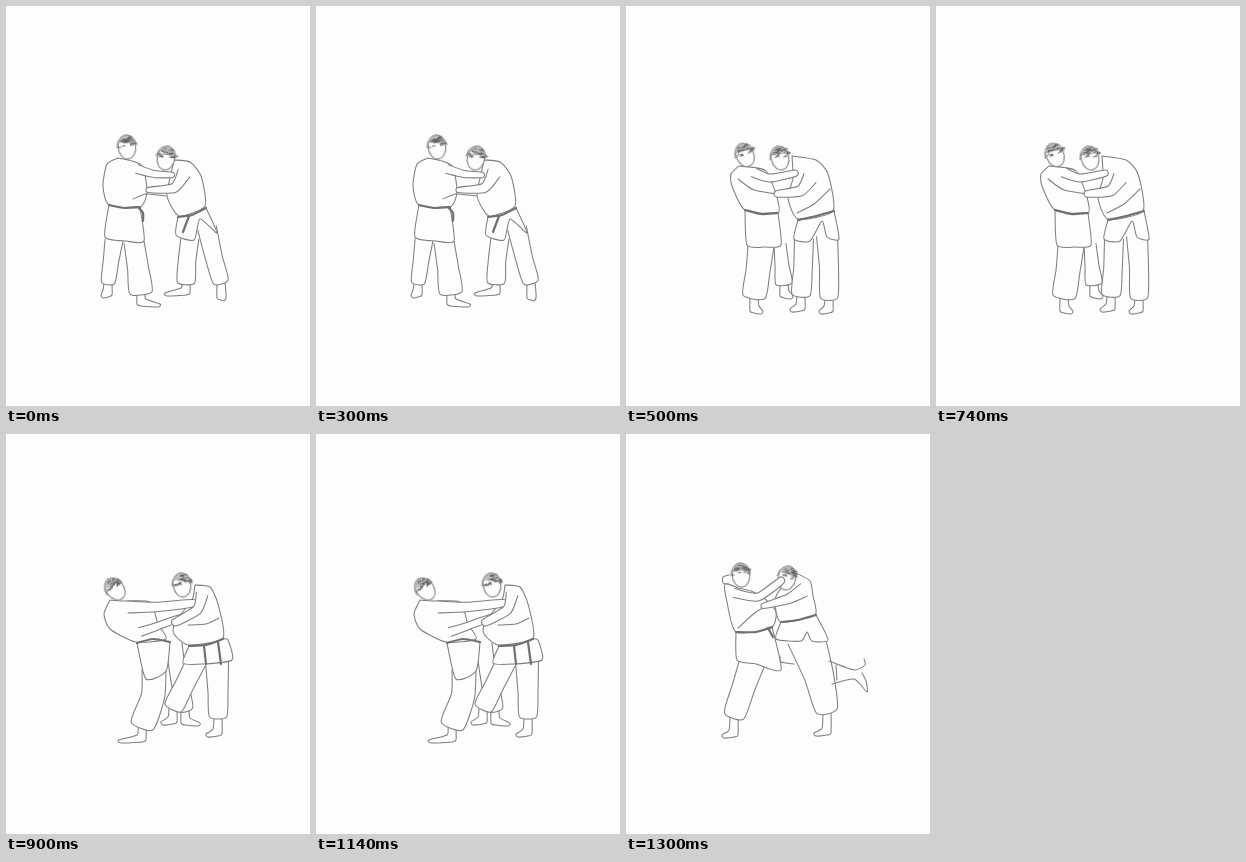
An HTML page for the animation above (1700 ms loop, 304 px wide and 400 px high).

```html
<!DOCTYPE html>
<html lang="en">
<head>
<meta charset="utf-8">
<title>Judo throw</title>
<style>
  html, body { margin: 0; width: 100%; height: 100%; overflow: hidden; background: #fdfdfd; }
  svg { display: block; width: 100%; height: 100%; }
  g { filter: blur(.3px); }
  path, ellipse { fill: #fdfdfd; stroke: #7e7e7e; stroke-width: 1.05; stroke-linecap: round; stroke-linejoin: round; }
  .fold { fill: none; }
  .belt { fill: none; stroke: #707070; stroke-width: 2.2; }
  .cap { fill: #bdbdbd; stroke: #868686; stroke-width: .7; }
  .strands { fill: none; stroke: #585858; stroke-width: .9; }
</style>
</head>
<body>
<svg id="stage" viewBox="0 0 304 400"></svg>
<script>
// Key points of each pose.
// head: x, y, tilt in degrees.  leg: centre line, toe, width at hip and cuff.
// arm: centre line, width at shoulder and wrist.
const poses = [
  { hold: 500, figures: [
    { head: [121, 141, -5],
      torso: '112,152 101,158 97,180 103,199 134,201 141,186 137,161 126,155',
      belt: '103,199 118,202 134,201', tails: '132,201 137,207 137,215', hem: '99,231 120,235 138,235',
      legs: [['108,234 105,255 102,277', '95,291', 18, 13], ['128,236 132,262 135,287', '154,300', 20, 22]],
      arms: [['131,163 148,168 167,169', 9, 5]], folds: '127,193 140,188 160,190' },
    { head: [160, 152, 10],
      torso: '168,154 184,156 195,170 199,200 173,210 161,190 165,168',
      belt: '172,211 186,209 200,202', tails: '183,210 177,226', hem: '170,229 188,234 194,213 211,227',
      legs: [['184,232 181,255 180,277', '159,289', 18, 17], ['201,222 208,252 215,276', '220,294', 19, 15]],
      arms: [['178,167 168,182 142,184', 14, 5]] }
  ]},
  { hold: 400, figures: [
    { head: [119, 149, -22],
      torso: '113,160 105,168 106,180 119,204 152,207 150,188 140,165 124,161',
      belt: '119,204 135,208 152,207', hem: '121,239 139,241 155,239',
      legs: [['154,238 156,260 158,278', '167,292', 12, 16], ['135,240 132,265 128,291', '137,307', 26, 22]],
      arms: [['127,166 144,172 170,167', 10, 6]], folds: '112,173 128,184 158,189' },
    { head: [154, 152, -12],
      torso: '166,150 190,154 202,168 207,205 172,213 162,192 167,172',
      belt: '172,214 190,210 208,205', hem: '168,233 184,235 196,215 201,231 213,233',
      legs: [['178,233 177,262 175,289', '164,305', 19, 18], ['201,230 203,262 203,292', '193,307', 21, 17]],
      arms: [['184,172 174,185 150,188', 15, 6]], folds: '204,183 188,198 171,207' }
  ]},
  { hold: 400, figures: [
    { head: [109, 155, -38],
      torso: '104,166 98,180 104,195 130,208 160,205 152,190 144,168 118,167',
      belt: '131,209 147,205 164,208', hem: '140,245 160,237',
      legs: [['168,210 172,240 179,275', '194,291', 16, 16], ['148,236 147,262 136,292', '113,308', 24, 23]],
      arms: [['122,173 150,173 188,169', 12, 7], ['134,198 152,192 176,183', 9, 6]] },
    { head: [176, 151, -8],
      torso: '189,151 204,153 212,170 217,204 183,211 168,200 169,188 186,166',
      belt: '183,212 200,211 217,205', tails: '198,212 200,230 / 212,208 215,230', hem: '177,229 197,230 226,226 222,206',
      legs: [['190,228 178,252 167,274', '155,290', 20, 18], ['211,228 212,258 212,283', '200,302', 23, 17]],
      arms: [['196,160 191,176 168,189', 12, 7]], folds: '213,184 200,190 182,191' }
  ]},
  { hold: 400, figures: [
    { head: [115, 141, -5],
      torso: '112,154 99,150 101,168 110,198 145,194 150,178 138,164 125,157',
      belt: '110,198 130,198 146,193', tails: '142,194 147,203', hem: '111,226 130,230 155,236',
      legs: [['127,226 118,252 108,282', '96,303', 26, 20]],
      arms: [['108,159 132,163 156,146', 9, 7]],
      folds: '112,194 130,178 152,166 / 103,141 97,143 97,149 103,150 / 154,222 155,228 168,230' },
    { head: [161, 144, 12],
      torso: '170,139 184,147 187,162 189,181 155,188 149,168 153,157',
      belt: '155,188 172,186 190,181', hem: '150,205 175,207 181,198 186,207 202,206',
      legs: [['180,204 193,242 201,277', '188,301', 38, 21]],
      arms: [['178,156 162,165 137,172', 14, 5]],
      folds: '203,227 228,236 239,231 238,225 / 206,250 228,245 241,258 240,247 236,239 / 210,231 211,246' }
  ]}
];

const HEAD = 11;
const stage = document.getElementById('stage');
const parse = text => text.trim().split(' ').map(p => p.split(',').map(Number));

let seed = 7;
const random = () => (seed = seed * 16807 % 2147483647) / 2147483647;

function add(parent, tag, attrs = {}) {
  const node = document.createElementNS('http://www.w3.org/2000/svg', tag);
  for (const key in attrs) node.setAttribute(key, attrs[key]);
  return parent.appendChild(node);
}

// Gently rounded curve through every point.
function curve(points) {
  const at = i => points[Math.max(0, Math.min(points.length - 1, i))];
  const handle = (i, side) => at(i).map((v, k) => v + side * (at(i + 1)[k] - at(i - 1)[k]) / 9);
  return 'M' + points[0] + points.slice(1)
    .map((p, i) => `C${handle(i, 1)} ${handle(i + 1, -1)} ${p}`).join('');
}

const draw = (group, points, type = 'cloth') => add(group, 'path', { class: type, d: curve(points) });
const drawAll = (group, text, type) => text?.split('/').forEach(s => draw(group, parse(s), type));

// Tapered sleeve or trouser leg around a centre line, open at the body.
function limb(group, line, from, to) {
  const points = parse(line), last = points.length - 1;
  const side = sign => points.map(([x, y], i) => {
    const a = points[Math.max(0, i - 1)], b = points[Math.min(last, i + 1)];
    const dx = b[0] - a[0], dy = b[1] - a[1];
    const reach = sign * (from + (to - from) * i / last) / 2 / Math.hypot(dx, dy);
    return [x - dy * reach, y + dx * reach];
  });
  draw(group, [...side(1), ...side(-1).reverse()]);
}

function leg(group, [line, toe, hip, cuff]) {
  const [x, y] = parse(line).at(-1), [tx, ty] = parse(toe)[0];
  const d = Math.sign(tx - x);
  draw(group, [[x - 4 * d, y], [x - 4 * d, ty - 2], [x, ty], [tx - 2 * d, ty + 1],
    [tx, ty - 2], [x + 5 * d, ty - 7], [x + 4 * d, y]]);
  limb(group, line, hip, cuff);
}

function head(group, [x, y, tilt]) {
  const top = add(group, 'g', { transform: `translate(${x} ${y}) rotate(${tilt})` });
  add(top, 'ellipse', { rx: HEAD * .8, ry: HEAD * 1.1 });
  add(top, 'path', { class: 'cap', d: curve([-150, -180, -225, -270, -315, -350].map(deg => {
    const a = deg * Math.PI / 180;
    return [HEAD * .92 * Math.cos(a), -HEAD * 1.1 * Math.sin(-a) * -1];
  }).map(([px, py]) => [px, -Math.abs(py)])) });
  let strands = '';
  for (let i = 0; i < 24; i++) {
    const a = Math.PI * (1 + random()), r = HEAD * (.35 + .6 * random());
    strands += `M${.85 * r * Math.cos(a)} ${r * Math.sin(a)}q2 -1.5 ${2 + 2 * random()} 0`;
  }
  add(top, 'path', { class: 'strands', d: strands });
}

function body(group, figure) {
  const belt = parse(figure.belt), torso = parse(figure.torso);
  figure.legs.forEach(spec => leg(group, spec));
  draw(group, [belt[0], ...parse(figure.hem), belt.at(-1)]);
  draw(group, [...torso, torso[0]]);
  draw(group, belt, 'belt');
  drawAll(group, figure.tails, 'belt');
  head(group, figure.head);
}

const loop = poses.reduce((sum, pose) => sum + pose.hold, 0);
let time = 0;
const starts = poses.map(({ hold }) => (time += hold) - hold);

poses.forEach(({ figures }, index) => {
  const group = add(stage, 'g');
  figures.forEach(figure => body(group, figure));
  figures.forEach(({ arms, folds }) => {
    arms.forEach(arm => limb(group, ...arm));
    drawAll(group, folds, 'fold');
  });

  const steps = starts.map((start, i) =>
    ({ offset: start / loop, opacity: +(i === index), easing: 'step-end' }));
  steps.push({ offset: 1, opacity: +(index === poses.length - 1) });
  group.animate(steps, { duration: loop, iterations: Infinity });
});
</script>
</body>
</html>
```
